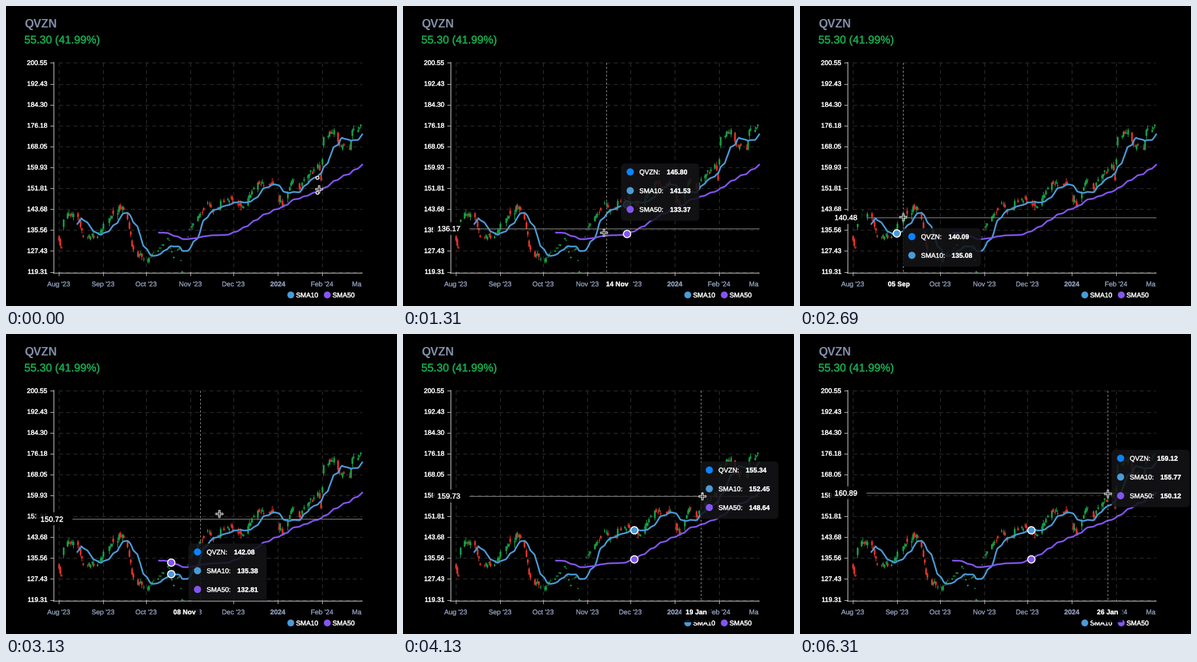
These frames come from a looping animation (600 px wide and 461 px high, 6370 ms). A matplotlib script:

```python
import numpy as np
import matplotlib.pyplot as plt
from matplotlib.animation import FuncAnimation
from matplotlib.collections import LineCollection
from matplotlib.patches import Circle, FancyBboxPatch, Rectangle
from matplotlib.patheffects import withStroke

W, H, DPI = 600, 461, 100
PX = 72 / DPI
FRAMES, STEP = 130, 49
TICKER = "QVZN"
GREEN, RED = "#16a34a", "#e5342b"
BLUE, SKY, VIOLET = "#0a84ff", "#4a9bd6", "#8455f0"
SLATE, WHITE, AXIS = "#8490ab", "#f4f4f4", "#b5b5b5"
LEFT, RIGHT, TOP, BOTTOM = 81, 546, 87.5, 408.5
LOW, SCALE, DAY_PX = 119.31, 3.951, 2.196

plt.rcParams["font.family"] = "Liberation Sans"
fig = plt.figure(figsize=(W / DPI, H / DPI), dpi=DPI, facecolor="black")
ax = fig.add_axes([0, 0, 1, 1])
ax.set_xlim(0, W)
ax.set_ylim(H, 0)
ax.axis("off")


def day_x(day):
    return LEFT + DAY_PX * np.asarray(day)


def price_y(price):
    return BOTTOM - (np.asarray(price) - LOW) * SCALE


def label(x, y, text, size, color=WHITE, weight="normal", ha="left", z=3, thick=0.3):
    """Text centred on y by its digit height; thick gives a medium weight."""
    item = ax.text(x, y + 0.36 * size, text, fontsize=size * PX, color=color,
                   weight=weight, ha=ha, va="baseline", zorder=z)
    if thick:
        item.set_path_effects([withStroke(linewidth=thick * PX, foreground=color)])
    return item


def move_label(item, x, y, size):
    item.set_position((x, y + 0.36 * size))


def line(xs, ys, color, width, z=2, **kw):
    return ax.plot(xs, ys, color=color, lw=width * PX, zorder=z, **kw)[0]


def dot(x, y, r, color, edge="none", width=0.0, z=3):
    return ax.add_patch(Circle((x, y), r, fc=color, ec=edge, lw=width * PX, zorder=z))


def mask(x, y, w, h):
    return ax.add_patch(Rectangle((x, y), w, h, fc="black", alpha=0.85, lw=0, zorder=4.5))


# Calendar: the first day of each month, counted from 1 August
months = ["Aug", "Sep", "Oct", "Nov", "Dec", "Jan", "Feb"]
starts = np.cumsum([0, 31, 30, 31, 30, 31, 31])
holidays = {34, 114, 146, 153, 167, 202}
days = np.array([d for d in range(213) if (d + 1) % 7 < 5 and d not in holidays])
xs = day_x(days)

# Turning points of the price as (day, close); noise fills the days between
turns = np.array([
    (0, 131.7), (2, 128.9), (3, 139.6), (6, 142.2), (13, 140.6), (17, 133.2), (27, 133.1),
    (31, 138.1), (44, 144.8), (48, 139.98), (51, 129.3), (56, 126), (63, 124.7), (76, 132.5),
    (80, 125.2), (84, 128.5), (86, 119.6), (87, 127.7), (92, 137), (99, 142.08), (105, 145.8),
    (107, 142.8), (118, 147.7), (128, 145), (139, 154.1), (150, 153.4), (156, 144.6),
    (163, 155.2), (169, 151.7), (171, 155.34), (178, 159.12), (181, 161.3), (183, 155.2),
    (185, 171.8), (192, 174.5), (196, 168.6), (203, 167.1), (205, 174.6), (212, 176.8),
])
rng = np.random.default_rng(8)
noise = np.where(np.isin(days, turns[:, 0]), 0, rng.normal(0, 0.6, len(days)))
closes = np.interp(days, *turns.T) + noise


def sma(n):
    out = np.full(len(closes), np.nan)
    out[n - 1:] = np.convolve(closes, np.ones(n) / n, "valid")
    return out


sma10, sma50 = sma(10), sma(50)


def draw_candles():
    change = np.diff(closes, prepend=133.5)
    calm = (days >= 64) & (days <= 92)
    # Large moves open with a gap, so their bodies stay short
    body = np.clip(0.7 * change, -2.5, 2.5) + rng.normal(0, 0.6, len(days))
    body = np.where(calm, 0.3, body)
    reach = np.where(calm, 0, np.abs(rng.normal(0, 0.7, (2, len(days)))) + 0.15)
    low, high = np.minimum(closes, closes - body), np.maximum(closes, closes - body)
    colors = np.where(body > 0, GREEN, RED)
    clip = Rectangle((LEFT - 2, TOP), RIGHT - LEFT + 2, BOTTOM - TOP + 1,
                     transform=ax.transData)
    for lo, hi, width in ((low - reach[0], high + reach[1], 1), (low, high, 2.6)):
        y1 = price_y(hi)
        y0 = np.maximum(price_y(lo), y1 + 1.4)
        segs = [[(x, a), (x, b)] for x, a, b in zip(xs, y0, y1)]
        group = LineCollection(segs, colors=colors, linewidths=width * PX,
                               capstyle="butt", zorder=2)
        ax.add_collection(group, autolim=False)
        group.set_clip_path(clip)


def draw_chart():
    label(28, 27, TICKER, 18, SLATE, "bold", thick=0)
    label(28, 51.4, "55.30 (41.99%)", 17, GREEN, thick=0.5)

    dash = (0, (6, 5))
    for i in range(11):
        y = BOTTOM - i * (BOTTOM - TOP) / 10
        line([LEFT, RIGHT], [y, y], "#303030", 1, 1, ls=dash)
        line([68, 72], [y, y], AXIS, 1, 1)
        label(63.6, y - 0.5, f"{LOW + 8.124 * i:.2f}", 10.2, ha="right", thick=0.45)
    for start, month in zip(starts, months):
        x = day_x(start)
        year = month == "Jan"
        suffix = "24" if month == "Feb" else "23"
        line([x, x], [TOP, BOTTOM], "#303030", 1, 1, ls=dash)
        line([x, x], [409, 414], AXIS, 1, 1)
        label(x, 427, "2024" if year else f"{month} '{suffix}", 10.5, SLATE,
              "bold" if year else "normal", "center")
    label(531, 427, "Ma", 10.5, SLATE)
    line([72.5, 72.5], [TOP - 1, 410], AXIS, 1.2, 1)
    line([72, RIGHT], [409.5, 409.5], AXIS, 1.2, 1)

    draw_candles()
    for x, name, color, curve in ((437, "SMA10", SKY, sma10), (493, "SMA50", VIOLET, sma50)):
        line(xs, price_y(curve), color, 2.5, 2.5)
        dot(x, 444, 5.3, color)
        label(x + 8, 444, name, 10.4, thick=0.4)


draw_chart()

# Hover layer
v_line = line([0, 0], [TOP, BOTTOM], "#9a9a9a", 1, 4, ls=(0, (3, 3)))
h_line = line([102, RIGHT], [0, 0], "#8c8c8c", 1, 4)
x_box, y_box = mask(0, 411, 46, 32), mask(46, 0, 56, 20)
x_text = label(0, 427, "", 10.5, weight="bold", ha="center", z=5, thick=0.15)
y_text = label(53, 0, "", 11.4, z=5, thick=0.4)
marks = [dot(0, 0, 5.6, c, "white", 1.6, 5) for c in (SKY, VIOLET)]
tip = ax.add_patch(FancyBboxPatch((0, 0), 120, 88, fc="#141417", alpha=0.88, lw=0, zorder=6,
                                  boxstyle="round,pad=0,rounding_size=6"))
rows = [(dot(0, 0, 5.5, color, z=7), label(0, 0, name, 10.4, z=7),
         label(0, 0, "", 10.4, weight="bold", z=7, thick=0.25))
        for name, color in ((TICKER + ":", BLUE), ("SMA10:", SKY), ("SMA50:", VIOLET))]
row_parts = [part for row in rows for part in row]
hover = [v_line, h_line, x_box, y_box, x_text, y_text, tip]

rest_dots = [dot(478, y, 2.4, "#333333", "white", 1.3, 5) for y in (264, 287)]
cursor = [(line([], [], c, w, 9, solid_capstyle="butt"),
           line([], [], c, w, 9, solid_capstyle="butt"), r)
          for c, w, r in (("#e6e6e6", 3.4, 6), ("#202020", 1.1, 4.8))]

# Pointer sweep as (time, x, y); the chart parts follow it with a delay in ms
sweep = np.array([
    (690, 480, 280), (1240, 313, 341), (1298, 308, 347), (2131, 178, 337.5), (2450, 145, 331),
    (2700, 160, 322), (2950, 253, 302), (3061, 298, 284.5), (3111, 327, 275),
    (4060, 454, 249), (4140, 459, 248.5), (4450, 472, 244.2),
])
LINE_LAG, LABEL_LAG, MARK_LAG = 50, 110, 160
HOVER_START, MARK_STOP = 1000, 355
# Tooltip centre height along x
tip_curve = np.array([(196, 371), (274, 366), (330, 284), (453, 239), (470, 222)])


def pointer(t):
    return [np.interp(t, sweep[:, 0], sweep[:, k]) for k in (1, 2)]


def move_cursor(x, y):
    for across, down, r in cursor:
        across.set_data([x - r, x + r], [y, y])
        down.set_data([x, x], [y - r, y + r])


def date_text(day):
    m = np.searchsorted(starts, day, "right") - 1
    return f"{day - starts[m] + 1:02d} {months[m]}"


def place_tip(left, middle, values):
    shown = int(np.isfinite(values).sum())
    height = 30.5 + 28.8 * (shown - 1)
    top = middle - height / 2
    tip.set_bounds(left, top, 120, height)
    for k, ((bullet, name, value), v) in enumerate(zip(rows, values)):
        y = top + 13 + 28.8 * k
        bullet.center = (left + 14, y)
        move_label(name, left + 28, y, 10.4)
        move_label(value, left + (70 if k == 0 else 75), y, 10.4)
        value.set_text(f"{v:.2f}")
        for item in (bullet, name, value):
            item.set_visible(k < shown)


def place_marks(x):
    for mark, curve in zip(marks, (sma10, sma50)):
        value = np.interp(x, xs, curve)
        known = bool(np.isfinite(value))
        mark.set_visible(known)
        if known:
            mark.center = (x, price_y(value))


def show(items, on):
    for item in items:
        item.set_visible(on)


def update(i):
    t = (i + 0.5) * STEP
    x, y = pointer(t)
    move_cursor(x, y + 1)
    active = t >= HOVER_START
    show(hover, active)
    show(rest_dots, not active)
    if not active:
        show(marks + row_parts, False)
        return []

    line_x, line_y = pointer(t - LINE_LAG)
    label_x, _ = pointer(t - LABEL_LAG)
    mark_x, _ = pointer(t - MARK_LAG)
    if t > 3000:
        mark_x = min(mark_x, MARK_STOP)

    k = int(np.argmin(np.abs(xs - line_x)))
    v_line.set_xdata([xs[k], xs[k]])
    h_line.set_ydata([line_y, line_y])
    x_box.set_x(label_x - 23)
    x_text.set_x(label_x)
    x_text.set_text(date_text(days[k]))
    y_box.set_y(line_y - 10)
    move_label(y_text, 53, line_y, 11.4)
    y_text.set_text(f"{LOW + (BOTTOM - line_y) / SCALE:.2f}")
    place_marks(mark_x)
    place_tip(label_x + 6, np.interp(label_x, *tip_curve.T),
              np.array([closes[k], sma10[k], sma50[k]]))
    return []


anim = FuncAnimation(fig, update, frames=FRAMES, interval=STEP, repeat=True,
                     repeat_delay=0, blit=False)
plt.show()
```
